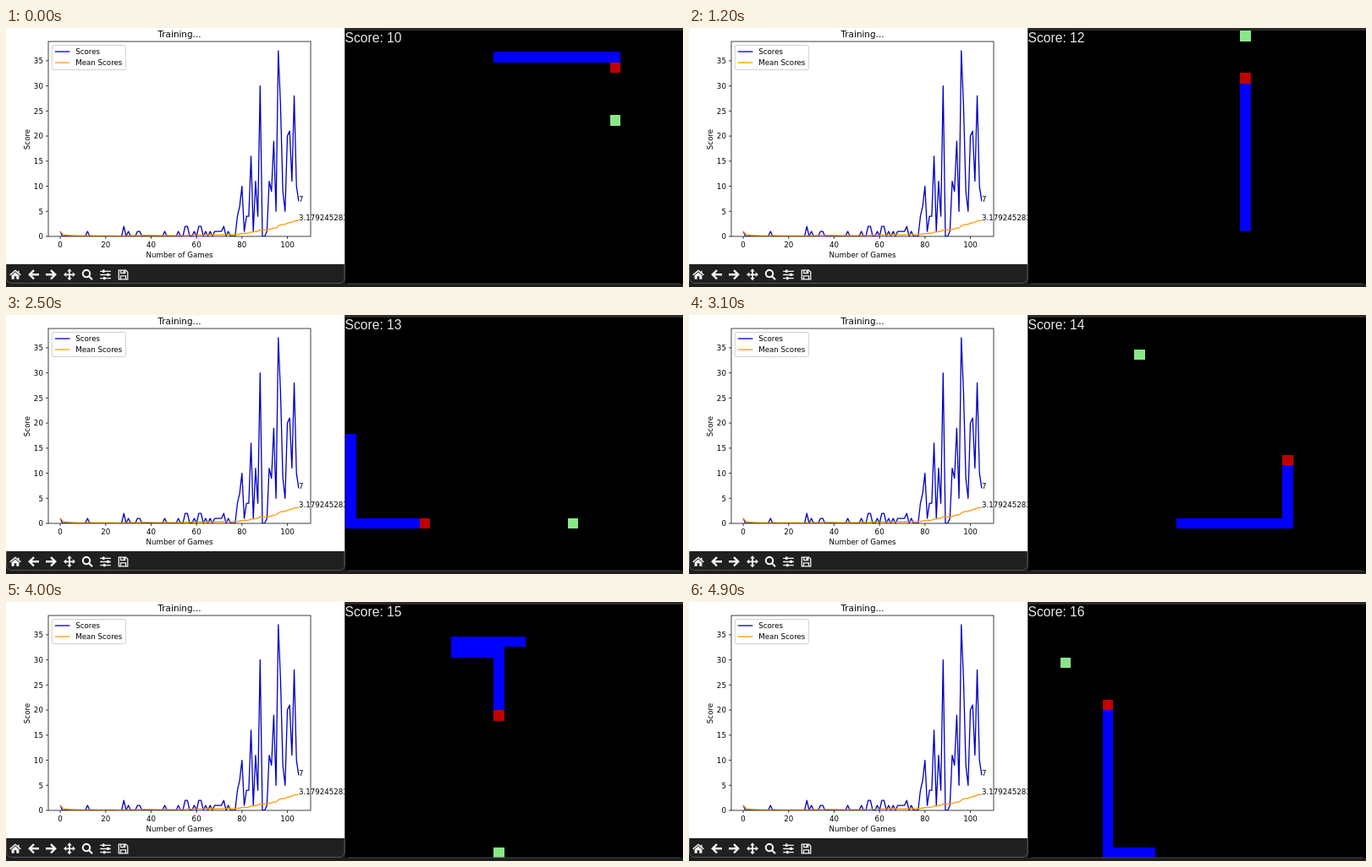
Write an HTML page with a canvas that moves like this. It is 800x307 px and loops after 5000 ms.

```html
<!DOCTYPE html>
<html lang="en">
<head>
<meta charset="utf-8">
<title>Training</title>
<style>
  html, body { margin: 0; height: 100%; overflow: hidden; background: #1e1e1e; }
  canvas { display: block; }
</style>
</head>
<body>
<canvas id="stage" width="800" height="307"></canvas>
<script>
const ctx = document.getElementById('stage').getContext('2d');

// ---------- helpers ----------
function text(str, x, y, size = 8.68, align = 'left', color = '#000', font = '"DejaVu Sans", sans-serif') {
  ctx.font = `${size}px ${font}`;
  ctx.textAlign = align;
  ctx.fillStyle = color;
  ctx.fillText(str, x, y);
}

function line(points, color, width) {
  ctx.beginPath();
  points.forEach(([x, y]) => ctx.lineTo(x, y));
  ctx.strokeStyle = color;
  ctx.lineWidth = width;
  ctx.stroke();
}

function panel(x, y, w, h, r, fill, stroke) {
  ctx.beginPath();
  ctx.roundRect(x, y, w, h, r);
  ctx.fillStyle = fill;
  ctx.fill();
  ctx.strokeStyle = stroke;
  ctx.lineWidth = 1;
  ctx.stroke();
}

// ---------- chart ----------
const scores = Array(78).fill(0);
[0, 12, 30, 34, 35, 46, 52, 59, 64, 66, 68, 69, 70, 71, 74].forEach(i => scores[i] = 1);
[28, 55, 56, 61, 62, 72].forEach(i => scores[i] = 2);
scores.push(4, 6, 10, 1, 4, 4, 16, 1, 11, 4, 30, 0, 0, 1, 11, 9, 19, 5,
            37, 26, 9, 5, 20, 21, 11, 28, 10, 7);
let sum = 0;
const means = scores.map((s, i) => (sum += s) / (i + 1));
const last = scores.length - 1;

const BLUE = '#0000c4', ORANGE = '#ff9800';
const px = x => 64.1 + x * 2.684;
const py = y => 247 - y * 5.946;
const plot = data => data.map((v, i) => [px(i), py(v)]);

function drawChart() {
  ctx.fillStyle = '#fff';
  ctx.fillRect(0, 0, 400, 280);

  ctx.save();
  ctx.beginPath();
  ctx.rect(50, 16, 310, 231);
  ctx.clip();
  ctx.lineJoin = 'round';
  line(plot(scores), BLUE, 1.3);
  line(plot(means), ORANGE, 1.3);
  ctx.restore();

  ctx.strokeStyle = '#000';
  ctx.lineWidth = 0.75;
  ctx.strokeRect(50, 16, 310, 231);
  for (let v = 0; v <= 100; v += 20) {
    line([[px(v), 247], [px(v), 250]], '#000', 0.75);
    text(v, px(v), 259.8, 8.68, 'center');
  }
  for (let v = 0; v <= 35; v += 5) {
    line([[47, py(v)], [50, py(v)]], '#000', 0.75);
    text(v, 43.9, py(v) + 3.3, 8.68, 'right');
  }
  text('Training...', 205, 11, 10.42, 'center');
  text('Number of Games', 205, 272.4, 8.68, 'center');
  ctx.save();
  ctx.translate(28, 132);
  ctx.rotate(-Math.PI / 2);
  text('Score', 0, 0, 8.68, 'center');
  ctx.restore();

  text(scores[last], px(last), py(scores[last]) + 0.4);
  text(means[last], px(last), py(means[last]) + 0.4);

  panel(54.3, 20.5, 87, 29, 1.7, 'rgba(255,255,255,.8)', '#d0d0d0');
  [['Scores', BLUE, 28], ['Mean Scores', ORANGE, 41]].forEach(([label, color, y]) => {
    line([[57.8, y], [75.4, y]], color, 1.3);
    text(label, 82.2, y + 3);
  });
}

// ---------- toolbar ----------
const arrow = 'M6 0H-5M0-5.2L-5.2 0L0 5.2';
const icons = [ // x, stroked path, filled path
  [11, 'M-6.3 .6L0-4.8L6.3 .6M3.8-4.5V-2', 'M-4.4 1L0-2.8L4.4 1V5.5H1.3V2H-1.3V5.5H-4.4Z', 1.4],
  [33, arrow, '', 2.4],
  [53, arrow, '', 2.4, -1],
  [75, 'M-5 0H5M0-5V5', 'M0-7L2.8-3.8H-2.8ZM0 7L2.8 3.8H-2.8ZM-7 0L-3.8-2.8V2.8ZM7 0L3.8-2.8V2.8Z', 1.8],
  [96, 'M3.2-1.2A4.2 4.2 0 1 1-5.2-1.2A4.2 4.2 0 1 1 3.2-1.2M2 2L6 6', '', 2.1],
  [117.5, 'M-6.3-4H6.3M-6.3 .2H6.3M-6.3 4.4H6.3',
    'M-3.5-5.7H-1V-2.4H-3.5ZM1.8-1.5H4.3V1.8H1.8ZM-2.5 2.8H0V6H-2.5Z', 1.3],
  [138.5, 'M-5.2-5.2H3L5.3-3V5.5H-5.2ZM-2.8-5V-1.7H2.2V-5M-3 5.2V1.6H3V5.2', 'M0-4.5H1.4V-2.3H0Z', 1.3]
].map(([x, stroke, fill, width, flip = 1]) =>
  ({ x, stroke: new Path2D(stroke), fill: new Path2D(fill), width, flip }));

function drawToolbar() {
  for (const icon of icons) {
    ctx.save();
    ctx.translate(icon.x, 292.3);
    ctx.scale(icon.flip, 1);
    ctx.strokeStyle = ctx.fillStyle = '#f4f4f4';
    ctx.lineWidth = icon.width;
    ctx.stroke(icon.stroke);
    ctx.fill(icon.fill);
    ctx.restore();
  }
}

// ---------- snake ----------
const CELL = 12.5, LEFT = 401, TOP = 3;
const corners = [[14, 2], [25, 2], [25, 8], [17, 8], [17, 21], [20, 21], [20, 0], [0, 0], [0, 19],
  [24, 19], [24, 3], [10, 3], [10, 4], [14, 4], [14, 23], [7, 23], [7, 9]];
const path = [corners[0]];
corners.slice(1).forEach(([cx, cy]) => {
  let [x, y] = path[path.length - 1];
  while (x !== cx || y !== cy) {
    x += Math.sign(cx - x);
    y += Math.sign(cy - y);
    path.push([x, y]);
  }
});
const foods = [[25, 8], [17, 21], [20, 0], [21, 19], [10, 3], [14, 23], [3, 5]];
const meals = [5, 26, 50, 110, 143, 167]; // step at which each food is eaten

function cell([x, y], color) {
  const edge = (start, n) => Math.round(start + n * CELL);
  const l = edge(LEFT, x), t = edge(TOP, y);
  ctx.fillStyle = color;
  ctx.fillRect(l, t, edge(LEFT, x + 1) - l, edge(TOP, y + 1) - t);
}

function drawGame(step) {
  const eaten = meals.filter(m => m <= step).length;
  const head = 12 + step;
  const tail = head - 12 - eaten;
  ctx.fillStyle = '#000';
  ctx.fillRect(LEFT, TOP, 399, 300);
  path.slice(tail, head).forEach(p => cell(p, '#0000ff'));
  cell(path[head], '#c00000');
  cell(foods[eaten], '#88e888');
  text('Score: ' + (10 + eaten), 400.6, 17.3, 15.63, 'left', '#e8e8e8',
    '"Liberation Sans", Arial, sans-serif');
}

// ---------- loop ----------
function draw(now) {
  const tick = Math.floor(now % 5000 / 100);
  ctx.fillStyle = '#1e1e1e';
  ctx.fillRect(0, 0, 800, 307);
  panel(0.5, -20, 399.5, 322.5, 6, '#202020', '#555');
  drawChart();
  drawToolbar();
  ctx.fillStyle = '#2a2a2a';
  ctx.fillRect(400, 0, 400, 3);
  drawGame(Math.floor(tick * 3.84 + 0.5));
  line([[400.5, 0], [400.5, 298]], '#444', 1);
  line([[404, 303], [796, 303]], '#444', 1);
  requestAnimationFrame(draw);
}
requestAnimationFrame(draw);
</script>
</body>
</html>
```
